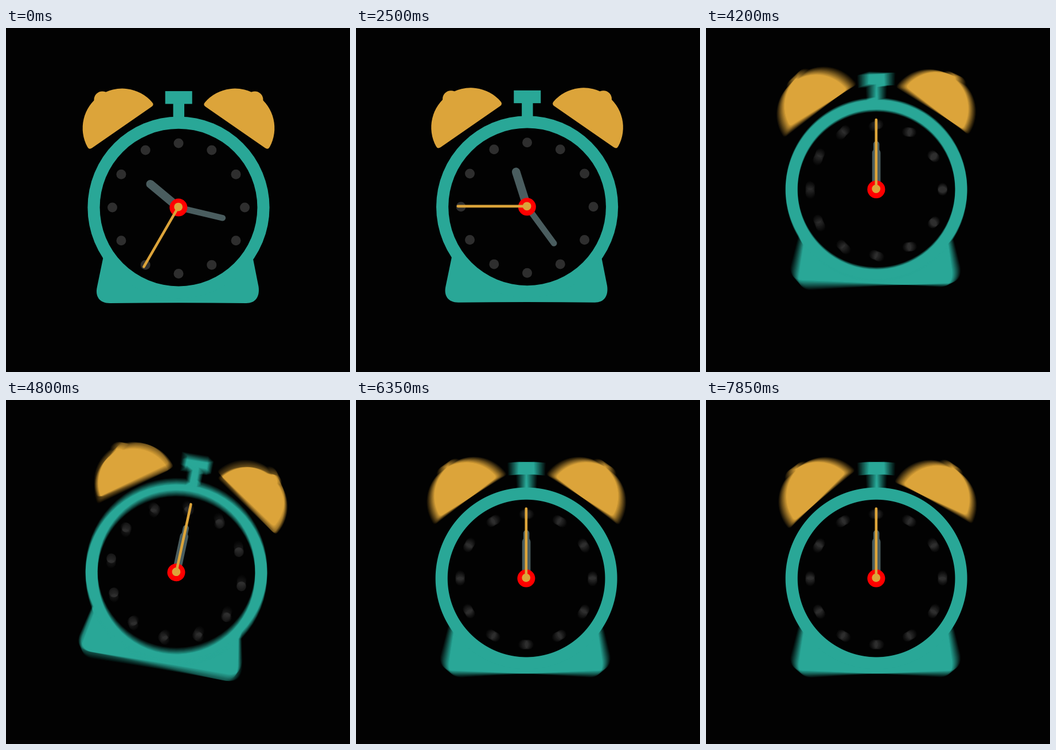
An HTML page with a canvas for the animation above (7.9 s loop, 600 by 600 pixels).

```html
<!DOCTYPE html>
<html lang="en">
<head>
<meta charset="utf-8">
<title>Alarm clock</title>
<style>
  html, body { margin: 0; width: 100%; height: 100%; overflow: hidden; background: #020202; }
  canvas { display: block; width: 600px; height: 600px; }
</style>
</head>
<body>
<canvas id="stage" width="600" height="600"></canvas>
<script>
const LOOP = 7900, STEP = 50;
const RING_START = 3900, ECHO = 4700, CYCLE = 800;
const SHUTTER = 25, SAMPLES = 16, SWING = 12.2;
const BACK = '#020202', TEAL = '#29a797', GOLD = '#dca43a', DOT = '#2e2e2e', HAND = '#4a5d5f';

const stage = document.getElementById('stage').getContext('2d');
const layer = document.createElement('canvas');
layer.width = layer.height = 600;
const body = layer.getContext('2d');

const BASE = new Path2D('M-131,85 L-142,138 C-146,155 -138,167 -120,167 Q0,165.3 118,167 C134,167 142,156 139.5,138 L129,85 Z');
const DOME = new Path2D('M-63,-2 Q-69.5,-2 -68.6,-8 A69,69 0 0 1 68.6,-8 Q69.5,-2 63,-2 Z');

const rad = deg => deg * Math.PI / 180;
const clamp = v => Math.min(1, Math.max(0, v));
const smooth = (a, b, v) => { const u = clamp((v - a) / (b - a)); return u * u * (3 - 2 * u); };

function disc(g, x, y, r, color) {
  g.fillStyle = color;
  g.beginPath();
  g.arc(x, y, r, 0, 2 * Math.PI);
  g.fill();
}

function hand(g, deg, length, width, color, x = 0, y = 0) {
  g.strokeStyle = color;
  g.lineWidth = width;
  g.lineCap = 'round';
  g.beginPath();
  g.moveTo(x, y);
  g.lineTo(x + length * Math.sin(rad(deg)), y - length * Math.cos(rad(deg)));
  g.stroke();
}

function bell(g, side, turn, px, py) {
  g.save();
  g.translate(px, py);
  g.rotate(rad(turn));
  g.translate(-px, -py);
  g.scale(side, 1);
  disc(g, -133, -188, 14.5, GOLD);
  g.translate(-98, -138);
  g.rotate(rad(-34.7));
  g.fill(DOME);
  g.restore();
}

// Clock pose; ring time s runs from the first shake
function pose(t, s) {
  const drift = clamp(t / 4000);
  const p = { x: 301 - 3.9 * drift, y: 313.1 - 2 * drift, angle: 0 };
  if (s > 0) {
    p.angle = SWING * 2 / Math.PI * Math.asin(Math.sin(2 * Math.PI * s / 200));
    if (s < 2 * CYCLE) {
      const j = s % CYCLE;
      p.y -= 40 * smooth(15, 120, j) - 43 * smooth(210, 490, j) + 3 * smooth(490, 600, j);
    }
  }
  return p;
}

function place(g, p) {
  g.setTransform(1, 0, 0, 1, p.x, p.y);
  g.rotate(rad(p.angle));
}

function drawBody(p, bellTurn) {
  const g = body;
  g.resetTransform();
  g.fillStyle = BACK;
  g.fillRect(0, 0, 600, 600);
  place(g, p);
  bell(g, 1, bellTurn, -97, -163);
  bell(g, -1, bellTurn, 143, -149);
  g.fillStyle = TEAL;
  g.fillRect(-23.3, -203, 47, 22.3);
  g.fillRect(-9.4, -182, 19.4, 30);
  g.fill(BASE);
  disc(g, 0, 0, 158.6, TEAL);
  disc(g, 0, 0, 137.4, BACK);
  for (let i = 0; i < 12; i++) {
    const a = i * Math.PI / 6, r = i ? 115.5 : 112;
    disc(g, r * Math.sin(a), -r * Math.cos(a), 8.5, DOT);
  }
}

function drawHands(t, p) {
  const g = stage, k = clamp(t / 3850);
  place(g, p);
  hand(g, 103.3 + 616.7 * k, 79, 10.5, HAND);
  hand(g, -50.3 * (1 - k), 64, 14.6, HAND);
  disc(g, -0.2, 0, 15.5, '#ff0000');
  hand(g, 210 + 2310 * k, 120.5, 4.6, GOLD, -0.3, -1);
  disc(g, -0.4, -1, 7.4, GOLD);
  g.resetTransform();
}

function draw(t) {
  // one pose is held twice between the two jumps
  const s = t - RING_START - (t > ECHO ? STEP : 0);
  const bellTurn = -7.4 * clamp((t - 7200) / 650);
  const count = s >= 0 ? SAMPLES : 1;
  for (let i = 0; i < count; i++) {
    const shift = count > 1 ? ((i + 0.5) / count - 0.5) * SHUTTER : 0;
    drawBody(pose(t, s + shift), bellTurn);
    stage.globalAlpha = 1 / (i + 1);
    stage.drawImage(layer, 0, 0);
  }
  stage.globalAlpha = 1;
  drawHands(t, pose(t, s));
}

const start = performance.now();
let shown = -1;
function tick() {
  const t = Math.floor((performance.now() - start) % LOOP / STEP) * STEP;
  if (t !== shown) draw(shown = t);
  requestAnimationFrame(tick);
}
tick();
</script>
</body>
</html>
```
